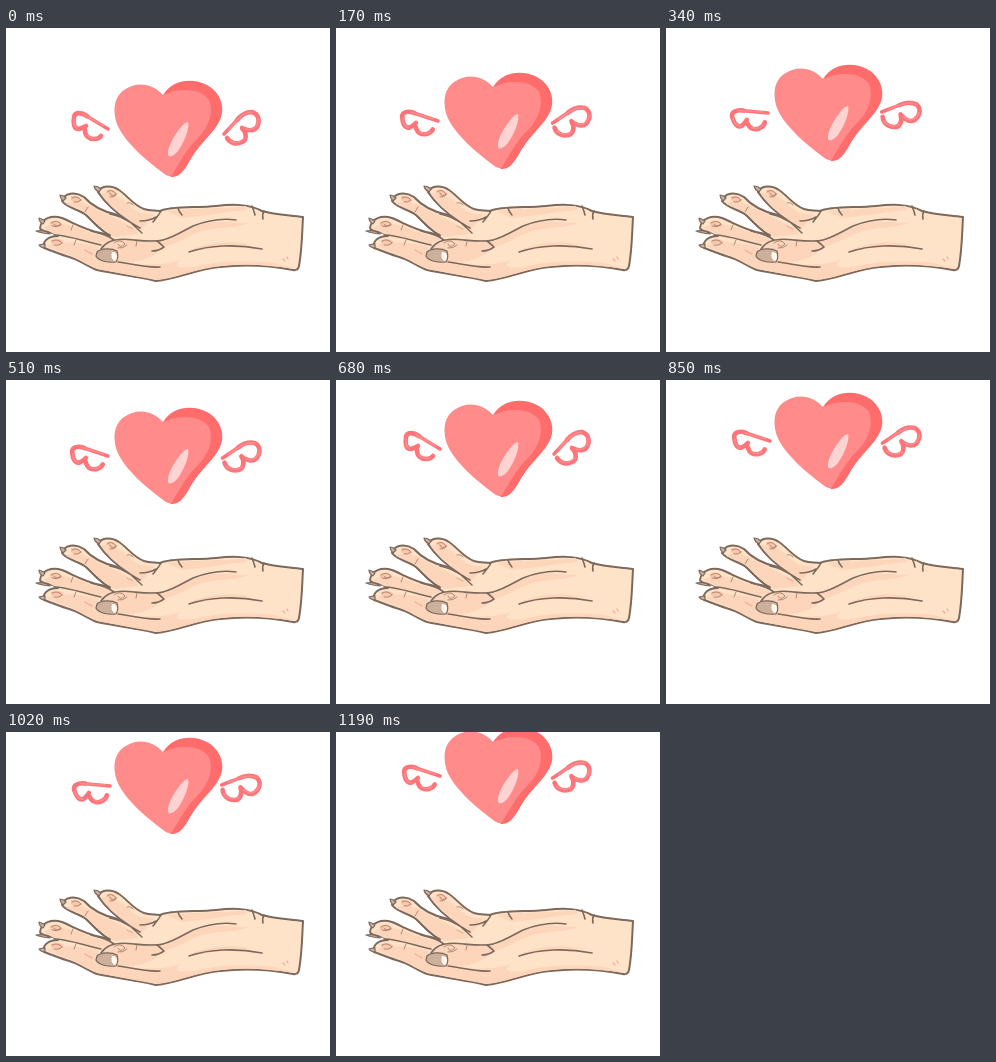
Animation of 324 by 324 pixels, one loop 1.36 s. Source, as an HTML page:

```html
<!DOCTYPE html>
<html lang="en">
<head>
<meta charset="utf-8">
<title>Heart over hand</title>
<style>
  html, body { margin: 0; height: 100%; overflow: hidden; background: #fff; }
  svg { display: block; width: 100vw; height: 100vh; }
  path { stroke-linecap: round; stroke-linejoin: round; }
  .skin { fill: #ffe3c9; stroke: #7c695c; stroke-width: 2; }
  .shade { fill: #fdd5bb; }
  .blush { fill: #fcc6ab; }
  .line { fill: none; stroke: #7c695c; stroke-width: 1.6; }
  .fine { fill: none; stroke: #a5806b; stroke-width: .9; }
  .nail { fill: #cdb09b; stroke: #7c695c; stroke-width: 1.2; }
  .wing { fill: none; stroke: #ff7479; stroke-width: 4.6; }
  .wing .root { stroke-width: 3.6; }
  .wing .glow { stroke: #ff8b8e; stroke-width: 1.6; }
</style>
</head>
<body>
<svg viewBox="0 0 324 324">
  <g id="hand">
    <!-- palm and wrist -->
    <path class="skin" d="M92 164C95 157 106 157 113 162C122 168 127 177 138 181C144 183 149 182 154 183C164 178 190 180 210 178C228 176 243 176 256 183C270 187 283 187 297 189C296 207 296 222 293 238Q292 243 287 242C266 238 240 236 214 239C190 241 172 251 150 253C136 249 110 246 91 242C82 239 75 232 60 228C51 225 44 222 38 220C36 212 44 208 52 208L47 205C41 204 35 203 34 200C35 190 46 187 56 190C68 195 79 202 95 205L104 208C95 202 86 193 80 187C72 181 61 180 56 173C58 165 69 163 78 169C86 178 97 184 112 187L124 194C114 187 101 177 92 164Z"/>
    <path class="shade" d="M62 227C80 227 96 236 116 235C138 237 156 238 175 232C163 241 180 241 196 237C223 232 246 233 268 235L289 241C261 237 235 235 208 239C186 242 168 251 150 252C130 248 110 245 92 241C80 237 75 232 62 227Z"/>
    <path class="shade" d="M60 176C68 171 82 175 91 182C104 188 118 194 129 201L134 206L108 209C94 202 84 187 76 183ZM94 166C106 162 118 172 126 180C134 186 142 187 148 186L135 202C119 193 105 181 94 166ZM37 200C52 192 68 198 80 203C90 206 98 208 105 212L94 216C78 214 64 208 50 207ZM40 218C54 211 72 215 92 218L94 236C80 232 70 228 60 226Z"/>
    <path class="shade" d="M158 214C174 204 190 196 208 194C222 193 233 195 243 195C231 200 212 199 197 203C183 207 171 216 158 219ZM160 183C186 180 217 181 240 178L241 182C220 184 197 188 176 190ZM186 221C205 214 226 212 248 217C230 216 210 218 186 224Z"/>
    <path class="blush" d="M100 162q7-2 11 4q-4 6-9 0ZM65 168q8-1 11 5q-6 3-11-1ZM44 194q8-3 13 3q-6 5-13 0ZM45 212q9-3 13 2q-7 5-13 1ZM107 214q10-4 16 2q-8 7-16 1Z"/>

    <!-- finger edges -->
    <path class="line" d="M104 207C92 202 87 193 80 187M92 164C101 178 113 187 124 194L136 205M104 186C117 188 125 195 134 200M48 207C63 207 79 214 95 217M85 203C94 205 101 207 108 212"/>
    <path class="line" d="M155 183C153 187 150 190 147 194M150 189C145 192 140 193 134 193"/>

    <!-- thumb -->
    <path class="shade" d="M95 222C101 211 114 210 128 212C139 213 149 214 159 212L157 220C149 228 133 237 112 234Z"/>
    <path class="line" d="M95 221C101 211 114 210 128 212C139 213 149 214 157 212C168 209 177 203 187 198C200 193 216 190 230 192M151 213C155 216 158 219 158 219C154 222 150 223 146 223M112 234C123 235 138 240 154 239"/>
    <path class="nail" d="M91 224C95 220 106 220 111 223Q113 230 110 234C102 235 92 233 90 228Z"/>
    <path d="M106 224q5 0 5 4q0 5-3 5q-4-4-2-9Z" fill="#fff8ee"/>

    <!-- nails -->
    <path class="nail" d="M93 164Q89 162 88 158Q92 158 95 161ZM57 173Q54 170 54 167Q57 167 60 170ZM44 206Q35 205 30 203Q36 202 41 204ZM37 196Q33 194 33 190Q36 191 39 193ZM39 220Q35 220 33 217Q36 216 39 216Z"/>

    <!-- creases -->
    <path class="line" d="M183 224C203 217 230 216 256 221M172 180Q173 184 176 187M246 178Q248 183 249 187M258 183Q256 186 257 191"/>
    <path class="fine" d="M101 164q5-4 9 2q-4 4-6-1M104 169q4 1 7-3M66 170q5-3 9 2M68 174q4 1 7-2M45 195q6-4 10 1q-5 4-7 0M46 198q4 2 9-1M46 213q6-3 10 2M48 217q5 1 8-2M108 215q6-5 11 1q-5 5-7 0M112 220q5 1 9-3M121 175q4-1 6 2M82 179l-3 5M67 197l-2 5M70 212l-2 5M131 213l-1 5"/>
    <path d="M277 231l2 2M281 229l1 2M121 198l6 3M79 222l7 4" fill="none" stroke="#f5a994" stroke-width="1.2"/>
  </g>

  <g id="flyer">
    <path fill="#ff6c6c" d="M157 67C167 51 187 50 201 57C214 64 220 79 214 92C208 105 195 114 186 129C180 139 175 150 165 149C149 137 120 114 111 94Z"/>
    <path fill="#ff8b8b" d="M157 67C147 55 130 53 118 62C107 70 107 84 111 96C118 114 142 134 160 147Q164 149 166 147C174 134 181 120 192 110C203 99 208 84 203 72C194 59 172 60 157 67Z"/>
    <path fill="#ffd3d2" d="M182 94C184 99 179 113 172 123C168 128 163 130 162 127C161 121 166 111 172 103C176 97 180 94 182 94Z"/>

    <g class="wing" id="left">
      <path class="root" d="M102 101L79 87"/>
      <path d="M81 88C75 84 69 84 68 89C67 96 68 101 73 101Q77 100 80 98M79 102C79 108 83 111 88 111Q93 111 95 108"/>
      <path class="glow" d="M98 98L77 86M68 91Q67 99 72 101M81 107Q86 112 92 110"/>
    </g>
    <g class="wing" id="right">
      <path class="root" d="M218 106C223 101 228 95 233 90"/>
      <path d="M231 92C235 87 240 84 246 84C253 86 254 93 251 99C248 103 242 103 236 100C241 105 241 112 236 114C230 117 224 115 221 110"/>
      <path class="glow" d="M223 101C230 93 237 84 246 84M252 90C253 99 246 103 240 101M239 110Q232 117 224 113"/>
    </g>
  </g>
</svg>
<script>
  const STEP = 170;
  const rise = [0, 8, 16, 25, 32, 40, 47, 57];
  const droop = [0, 13, 26, 13];
  const [flyer, left, right] = ["flyer", "left", "right"].map(id => document.getElementById(id));

  function draw(now) {
    const i = Math.floor(now / STEP) % rise.length;
    const angle = droop[i % droop.length];
    const drift = i < 4 ? 0 : 2;
    flyer.setAttribute("transform", `translate(0 ${-rise[i]})`);
    left.setAttribute("transform", `translate(${drift} 0) rotate(${-angle} 102 101)`);
    right.setAttribute("transform", `rotate(${angle} 230 98)`);
  }

  const start = performance.now();
  function tick() {
    draw(performance.now() - start);
    requestAnimationFrame(tick);
  }
  tick();
</script>
</body>
</html>
```
